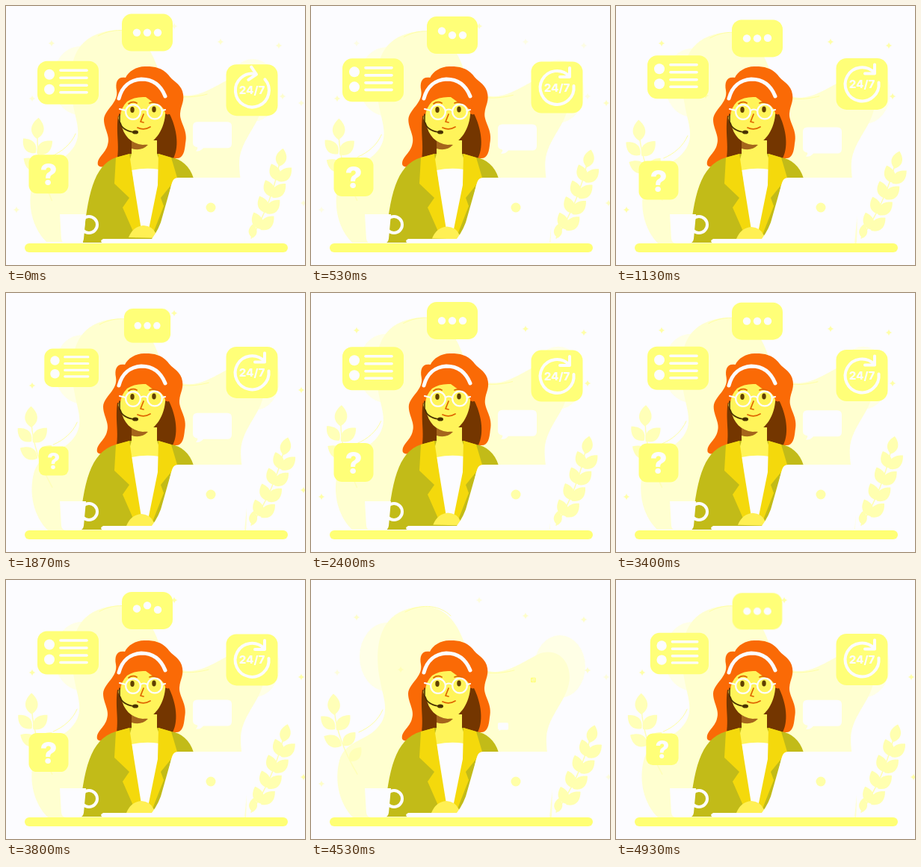
These frames come from a looping animation (400x347 px, 4990 ms). An HTML page:

```html
<!DOCTYPE html>
<html lang="en">
<head>
<meta charset="utf-8">
<title>Customer support</title>
<style>
html, body { margin: 0; width: 100%; height: 100%; overflow: hidden; background: #fcfcff; }
svg { display: block; width: 100vw; height: 100vh; }
text { font-family: Inter, "Open Sans", sans-serif; font-weight: 800; fill: #fcfcff; text-anchor: middle; }
.line { fill: none; stroke-linecap: round; stroke-linejoin: round; }
.white { fill: #fcfcff; }
.whiteLine { stroke: #fcfcff; }
.card { fill: #ffff78; }
</style>
</head>
<body>
<svg viewBox="0 0 400 347" preserveAspectRatio="none">
  <defs>
    <path id="blob" d="M57 319C38 300 31 270 38 242C45 216 72 216 88 199C108 178 96 158 92 132C87 104 88 75 103 56C121 34 160 29 180 45C204 64 204 94 221 112C246 138 281 111 303 100C328 89 346 107 346 130C346 159 317 180 315 211C314 240 326 265 322 319Z"/>
    <path id="leaf" d="M0 0C-12 -8 -9 -19 0 -27C9 -19 12 -8 0 0Z"/>
    <path id="spark" d="M0 -4.5Q.7 -.7 4.5 0Q.7 .7 0 4.5Q-.7 .7 -4.5 0Q-.7 -.7 0 -4.5Z"/>
  </defs>

  <g id="backdrop">
    <ellipse cx="102" cy="103" rx="37" ry="46" fill="#ffffe6"/>
    <ellipse cx="333" cy="116" rx="34" ry="42" fill="#ffffe6"/>
    <use href="#blob" fill="#ffffd0"/>
    <path class="line" stroke="#ffffa4" d="M126 43C150 30 174 35 187 48M216 118C232 127 252 126 272 121M64 204C78 198 90 188 96 174"/>
  </g>
  <g id="sparksA" fill="#ffffa8"></g>
  <g id="sparksB" fill="#ffffa8"></g>
  <g id="leftPlant" fill="#ffffb8"></g>
  <g id="rightPlant" fill="#ffffb0"></g>

  <g id="list">
    <rect class="card" x="-41" y="-29" width="82" height="58" rx="13"/>
    <circle class="white" cx="-25" cy="-11" r="7"/><circle class="white" cx="-25" cy="9" r="7"/>
    <path class="line whiteLine" stroke-width="3.6" d="M-10 -16.500H25M-10 -6.500H25M-10 3.500H25M-10 13H25"/>
  </g>
  <g id="typing">
    <rect class="card" x="-34" y="-25" width="68" height="50" rx="13"/>
    <circle class="white" cx="-14" r="5.2"/><circle class="white" r="5.2"/><circle class="white" cx="14" r="5.2"/>
  </g>
  <g id="clock">
    <rect class="card" x="-34.500" y="-34.500" width="69" height="69" rx="14"/>
    <g id="arrow" class="line whiteLine" stroke-width="4">
      <path d="M16.500 -15A22.500 22.500 0 1 0 22.500 -2"/>
      <path d="M4 -14H17V-26"/>
    </g>
    <text y="5.500" font-size="15">24/7</text>
  </g>
  <g id="question">
    <rect class="card" x="-26.500" y="-26" width="53" height="52" rx="11"/>
    <text y="15" font-size="40">?</text>
  </g>
  <g id="speech" class="white">
    <path d="M-20 -18H20Q26 -18 26 -12V11Q26 17 20 17H-12Q-16 22 -22 21Q-19 18 -20 16Q-26 15 -26 10V-12Q-26 -18 -20 -18Z"/>
  </g>

  <g id="hairBack">
    <path fill="#fa6a06" d="M187 81C175 80 163 87 159 96C148 94 145 102 147 113C150 130 131 138 130 152C130 165 139 174 135 186C132 198 120 203 122 213C126 219 141 214 151 204H226C236 205 238 195 239 184C243 166 231 156 232 144C233 132 239 127 235 114C231 103 222 101 216 92C208 83 198 81 187 81Z"/>
    <path fill="#743600" d="M150 141C145 166 151 183 148 204H223C232 186 226 161 218 145Z"/>
  </g>
  <path id="jacket" fill="#c2bb18"/>
  <path fill="#fff45a" d="M168 180H202V198L210 220L188 234L162 220L168 198Z"/>
  <path fill="#a5651c" d="M168 179Q185 186 190 186Q181 195 168 191Z"/>
  <path class="white" d="M168 220Q187 216 205 219L203 246L194 300H179L172 250Z"/>
  <path fill="#f4d90c" d="M165 198L147 203L145 238L165 257L156 270L174 311L181 300L171 238ZM204 198L221 203L229 230L207 257L211 268L195 309L191 299L203 240Z"/>
  <g id="hand"><path fill="#fff054" d="M161 312Q167 297 181 296Q193 297 197 306L202 313Z"/></g>

  <path fill="#fff45a" d="M152 134Q151 105 183 106Q210 108 213 134V146C211 168 197 186 183 186C167 184 157 174 154 157Q148 151 152 145Z"/>
  <path fill="#fa6a06" d="M149 147C145 119 156 100 180 97C202 96 215 111 217 146L213 143Q210 132 198 130L187 122Q172 121 162 128Q154 136 153 147Z"/>
  <path class="line whiteLine" stroke-width="5" d="M151 124C155 108 166 99 181 98C196 98 207 106 213 121"/>
  <g fill="#604000"><ellipse cx="169" cy="139" rx="2.700" ry="4"/><ellipse cx="198" cy="138.500" rx="2.700" ry="4"/></g>
  <path class="line" stroke="#df6500" stroke-width="1.700" d="M164 131Q169 127 175 130M192 130Q197 128 203 131M184 145L180 155L184 156M176 163Q185 167 193 162"/>
  <g class="line whiteLine" stroke-width="2.200">
    <circle cx="170" cy="142" r="9.800"/><circle cx="199" cy="141.500" r="9.800"/><path d="M180 140Q184 137 189 140M160 140L152 138M209 140L213 139"/>
  </g>
  <path class="line" stroke="#493100" stroke-width="1.600" d="M152 145V155Q155 167 171 169"/>
  <ellipse cx="173" cy="169" rx="4" ry="2.600" fill="#493100"/>

  <rect x="25" y="318" width="352" height="12" rx="6" fill="#ffff74"/>
  <path class="white" d="M130 312H205V318H130Q124 315 130 312Z"/>
  <path class="white" d="M230 230H321Q328 230 327 238L319 318H190Q201 306 207 290L222 237Q224 230 230 230Z"/>
  <circle cx="274" cy="270" r="6.500" fill="#ffffa8"/>
  <path class="white" d="M72 279H107L104 312Q103 318 97 318H81Q75 318 74 312Z"/>
  <circle class="line whiteLine" cx="111" cy="293" r="11" stroke-width="4"/>
</svg>
<script>
const LOOP = 4990, CYCLE = 3040, OFFSET = 40, RESTART = 1385, GROW = 300;
const el = id => document.getElementById(id);
const clamp = v => Math.max(0, Math.min(1, v));
const smooth = v => v * v * (3 - 2 * v);
const place = (id, transform) => el(id).setAttribute("transform", transform);

const use = (shape, x, y, angle, scale) =>
  `<use href="#${shape}" transform="translate(${x} ${y}) rotate(${angle}) scale(${scale})"/>`;
const sparks = points => points.map(([x, y]) => use("spark", x, y, 0, 1)).join("");
el("sparksA").innerHTML = sparks([[61, 50], [287, 48], [365, 53], [370, 121], [120, 120], [14, 273]]);
el("sparksB").innerHTML = sparks([[35, 124], [395, 130], [398, 264], [225, 27]]);

const stem = (d, color) => `<path class="line" stroke="${color}" stroke-width="1.5" d="${d}"/>`;
el("leftPlant").innerHTML = stem("M31 175Q35 215 62 260", "#ffffb8") +
  [[31, 181, -3, 1.05], [32, 200, -48, .95], [34, 201, 42, 1], [41, 222, -62, 1], [43, 222, 42, .9], [52, 243, 38, .9]]
    .map(l => use("leaf", ...l)).join("");
let rightLeaves = use("leaf", 373, 218, 16, .9) + use("leaf", 330, 311, 5, .7);
for (let i = 0; i < 4; i++) {
  const x = 370 - i * 9.5, y = 237 + i * 21;
  rightLeaves += use("leaf", x, y, -18, .9) + use("leaf", x, y + 1, 48, .95);
}
el("rightPlant").innerHTML = stem("M374 211Q360 265 328 311", "#ffffb0") + rightLeaves;

// Each card bobs from its rest height and grows out of one corner or edge.
const cards = [
  { id: "typing", x: 189, y: 35.3, bob: 8.5, pivot: [0, 25], start: 1637 },
  { id: "list", x: 83, y: 103, bob: -8.2, pivot: [41, 29], start: 1645 },
  { id: "clock", x: 329, y: 113, bob: -9, pivot: [-35, 33], start: 1502 },
  { id: "question", x: 57, y: 225, bob: 9, pivot: [27, -26], start: 1686 },
  { id: "speech", x: 276, y: 173, bob: 8, pivot: [-26, 21], start: 1450 }
];
const dots = [...el("typing").querySelectorAll("circle")];

// The cards vanish at once when their cycle restarts, then pop in one by one.
const cardScale = (phase, start) => phase < RESTART ? 1 : clamp((phase - start) / GROW);

function spin(phase) {
  const u = clamp(((phase < 1000 ? phase + CYCLE : phase) - 2480) / 770);
  return 360 * (u < .5 ? 2 * u * u : 1 - 2 * (1 - u) ** 2);
}

function draw(time) {
  const phase = (time + OFFSET) % CYCLE;
  const wave = (1 + Math.cos(2 * Math.PI * (phase - RESTART) / CYCLE)) / 2;

  for (const { id, x, y, bob, pivot: [px, py], start } of cards) {
    place(id, `translate(${x + px} ${y + bob * wave + py}) scale(${cardScale(phase, start)}) translate(${-px} ${-py})`);
  }
  dots.forEach((dot, i) => dot.setAttribute("cy", -7 * Math.sin(Math.PI * clamp((phase - 450 - 165 * i) / 400))));
  place("arrow", `rotate(${spin(phase)})`);

  const twinkle = clamp(.5 + .9 * Math.cos(2 * Math.PI * (3 * phase / CYCLE - .28)));
  el("sparksA").style.opacity = twinkle;
  el("sparksB").style.opacity = 1 - twinkle;

  const sway = 1 - wave;
  place("leftPlant", `rotate(${8 * sway} 58 255)`);
  place("rightPlant", `rotate(${-4.5 * sway} 328 311)`);
  place("backdrop", `translate(${-3 * sway} ${-3 * sway})`);

  const lean = 1 - smooth(clamp(wave / .7));
  place("hairBack", `translate(${lean} 0)`);
  place("hand", `translate(${3 * lean} ${-2 * lean})`);
  const edge = 98 + 5 * lean;
  el("jacket").setAttribute("d",
    `M166 198L147 203C${edge + 14} 213 ${edge + 6} 255 ${edge} 317H204L223 231H251C246 214 234 205 221 203L204 198Z`);
}

const began = performance.now();
function tick() {
  draw((performance.now() - began) % LOOP);
  requestAnimationFrame(tick);
}
tick();
</script>
</body>
</html>
```
